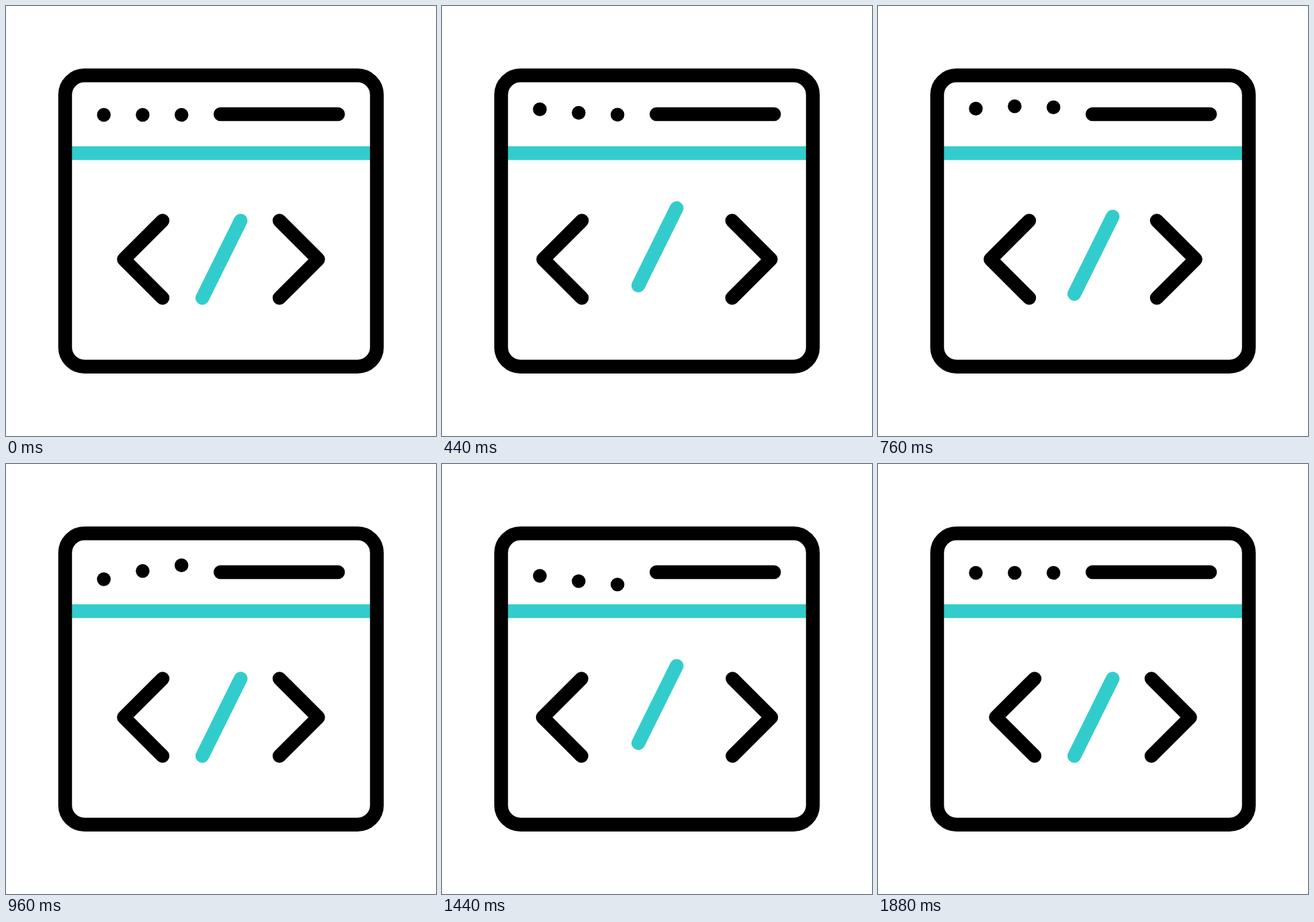
Recreate the animation shown at these times as an HTML page. Size 640 by 640 pixels, loop 1.92 s.

```html
<!DOCTYPE html>
<html lang="en">
<head>
<meta charset="utf-8">
<title>Code window</title>
<style>
  html, body { margin: 0; width: 100%; height: 100%; overflow: hidden; background: #fff; }
  svg { display: block; width: 100%; height: 100%; }
</style>
</head>
<body>
<svg viewBox="0 0 640 640" fill="none" stroke="#000" stroke-width="20.48" stroke-linecap="round" stroke-linejoin="round">
  <path d="M98 219H542" stroke="#3cc" stroke-linecap="butt"/>
  <rect x="88" y="103.3" width="464" height="433.4" rx="28.8"/>
  <path d="M319.2 161H494.2"/>
  <g fill="#000" stroke="none">
    <circle class="dot" cx="145.6" cy="162" r="10.24"/>
    <circle class="dot" cx="203.4" cy="162" r="10.24"/>
    <circle class="dot" cx="261.2" cy="162" r="10.24"/>
  </g>
  <path id="left" d="M233 319.5L175.4 377L233 434.5"/>
  <path id="right" d="M407 319.5L464.6 377L407 434.5"/>
  <path id="slash" d="M349.2 319.5L292.2 434.5" stroke="#3cc"/>
</svg>
<script>
const STEP = 40, LOOP = 1920;
const [left, right, slash] = ['left', 'right', 'slash'].map(id => document.getElementById(id));
const dots = document.querySelectorAll('.dot');

// Keys are [step, value] pairs, with time counted in 40 ms steps.
const spread = [[1.8, 0], [12.3, 1], [13, 1], [22.8, 0], [24.5, 0], [34.7, 1], [35.4, 1], [45.5, 0]];
const bounce = [[4, 0], [16, -12.8], [28.6, 17.92], [40, 0]];
const DOT_DELAY = 3;

// Same curve as CSS ease-in-out
function ease(x) {
  let u = x;
  for (let i = 0; i < 5; i++) {
    u -= (((.52 * u - .78) * u + 1.26) * u - x) / ((1.56 * u - 1.56) * u + 1.26);
  }
  return u * u * (3 - 2 * u);
}

function valueAt(keys, n) {
  const next = keys.findIndex(([at]) => at > n);
  if (next < 0) return keys[keys.length - 1][1];
  if (next === 0) return keys[0][1];
  const [a, from] = keys[next - 1], [b, to] = keys[next];
  return from + (to - from) * ease((n - a) / (b - a));
}

const move = (el, x, y) => el.setAttribute('transform', `translate(${x} ${y})`);

function draw() {
  const n = Math.floor(performance.now() % LOOP / STEP);
  const p = valueAt(spread, n);
  move(left, -25.6 * p, 0);
  move(right, 25.6 * p, 0);
  move(slash, 0, -19.2 * p);
  dots.forEach((dot, i) => move(dot, 0, valueAt(bounce, n - i * DOT_DELAY)));
  requestAnimationFrame(draw);
}
draw();
</script>
</body>
</html>
```
